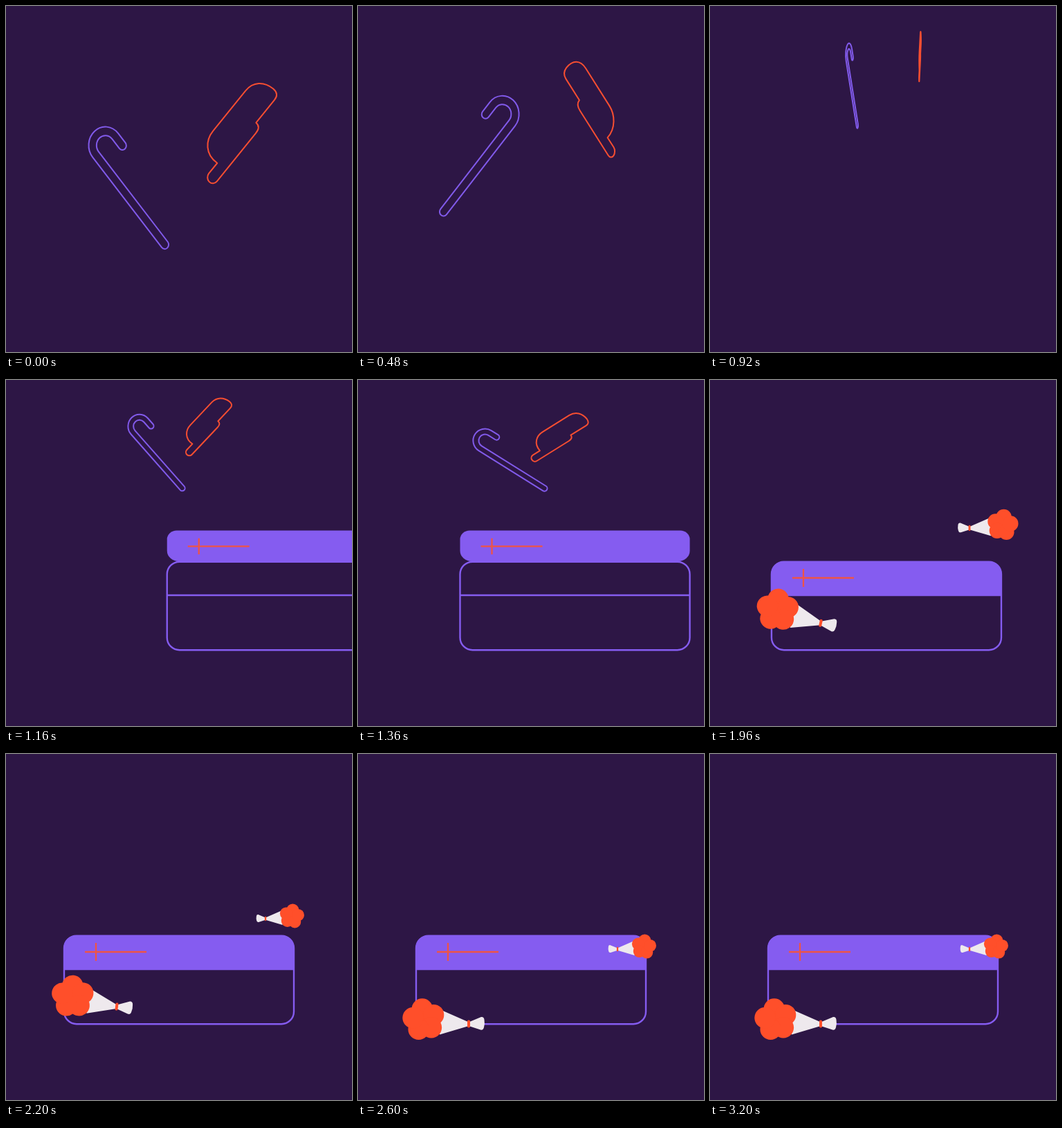
These frames come from a looping animation (500 by 500 pixels, 3.24 s). An HTML page with a canvas:

```html
<!DOCTYPE html>
<html lang="en">
<head>
<meta charset="utf-8">
<title>Gift box</title>
<style>
html, body { margin: 0; width: 100%; height: 100%; overflow: hidden; background: #2d1645; }
canvas { display: block; width: 500px; height: 500px; }
</style>
</head>
<body>
<canvas id="stage" width="500" height="500"></canvas>
<script>
const LOOP = 3240, STEP = 40;
const BG = '#2d1645', PURPLE = '#855cf0', ORANGE = '#ff4f2a', WHITE = '#eee9ed';
const WALL = 311, HINGE = 262, LID = 49.5, APEX = 1065, SLAM = 1880, LAND = 2340;
const ctx = document.getElementById('stage').getContext('2d');

const rad = deg => deg * Math.PI / 180;
const part = (t, from, to) => Math.max(0, Math.min(1, (t - from) / (to - from)));
const ease = (t, from, to) => (1 - Math.cos(Math.PI * part(t, from, to))) / 2;
const bump = (t, from, to) => Math.sin(Math.PI * part(t, from, to));

const CANE = {
  path: canePath, color: '#815aea',
  x: 173, drift: 39.4, lean: 7.2,
  y: 262, rise: 157.5, drop: 222.5, gravity: 3.62,
  size: 0.64, angle: -40.5, tumble: -77.5, spin: 0.0073, drag: 1.5e-6
};
const HAT = {
  path: hatPath, color: '#f64e31',
  x: 342, drift: -49, lean: 0,
  y: 183, rise: 116, drop: 246.5, gravity: 3.34,
  size: 0.585, angle: -48.2, tumble: 72, spin: 0.00565, drag: 0
};

function canePath() {
  const w = 6.3, r = 20.5, x = 9, y = -72, end = y + 171, tail = y + 18;
  ctx.moveTo(x - r - w, y);
  ctx.arc(x, y, r + w, Math.PI, 0);
  ctx.lineTo(x + r + w, tail);
  ctx.arc(x + r, tail, w, 0, Math.PI);
  ctx.lineTo(x + r - w, y);
  ctx.arc(x, y, r - w, 0, Math.PI, true);
  ctx.lineTo(x - r + w, end);
  ctx.arc(x - r, end, w, 0, Math.PI);
  ctx.closePath();
}

function hatPath() {
  ctx.moveTo(-60, -1);
  ctx.bezierCurveTo(-64, -24, -48, -37, -30, -37);
  ctx.lineTo(48, -37);
  ctx.bezierCurveTo(66, -37, 78, -24, 80, -6);
  ctx.quadraticCurveTo(81, 6.5, 69, 6.5);
  ctx.lineTo(25, 6.5);
  ctx.quadraticCurveTo(26, 16.3, 13, 16.3);
  ctx.lineTo(-80, 16.3);
  ctx.arc(-80, 7.6, 8.7, Math.PI / 2, -Math.PI / 2);
  ctx.closePath();
}

// Rises while flipping and shrinking, then tumbles down behind the box wall
function toss(o, t) {
  const fall = Math.max(0, t - APEX) / 655;
  if (fall > 1.15) return;
  const flip = Math.min(2 * Math.PI, -0.45 + o.spin * t - o.drag * t * t);
  const x = o.x + o.drift * ease(t, 200, 1240);
  const y = o.y - o.rise * ease(t, 145, APEX) + o.drop * fall ** o.gravity;
  const size = 1 - (1 - o.size) * ease(t, 410, 930);
  const angle = o.angle + 14 * Math.sin(flip) ** 6 + o.tumble * fall ** 1.86;
  ctx.save();
  ctx.beginPath();
  ctx.rect(0, 0, 500, t > 1360 ? WALL : 500);
  ctx.clip();
  ctx.save();
  ctx.translate(x, y);
  ctx.scale(Math.cos(flip), 1);
  ctx.translate(o.lean, 0);
  ctx.scale(size, size);
  ctx.rotate(rad(angle));
  ctx.beginPath();
  o.path();
  ctx.restore();
  ctx.strokeStyle = o.color;
  ctx.lineWidth = 2;
  ctx.lineJoin = 'round';
  ctx.stroke();
  ctx.restore();
}

const boxLeft = t => 84 + (t > 2160 ? 0 : 63.5 * Math.exp((1360 - t) / 235));

// -1 is fully open, 1 fully closed
const lidFold = t => -Math.cos(rad(26 + 154 * part(t, 1560, SLAM) ** 2.6));

function lid(x, fold) {
  const corner = fold < 0 ? 14 : 14 * (1 - fold);
  ctx.save();
  ctx.translate(x, HINGE);
  ctx.scale(1, fold);
  ctx.beginPath();
  ctx.roundRect(0, 0, 332, LID, [17, 17, corner, corner]);
  ctx.fillStyle = PURPLE;
  ctx.fill();
  ctx.beginPath();
  ctx.moveTo(30, 24);
  ctx.lineTo(119, 24);
  ctx.moveTo(46, 11);
  ctx.lineTo(46, 37);
  ctx.restore();
  ctx.strokeStyle = '#ee5446';
  ctx.lineWidth = 2.3;
  ctx.stroke();
}

function box(x) {
  ctx.strokeStyle = PURPLE;
  ctx.lineWidth = 2.4;
  ctx.beginPath();
  ctx.roundRect(x, HINGE + 0.7, 332, 127.5, 18);
  ctx.moveTo(x, WALL);
  ctx.lineTo(x + 332, WALL);
  ctx.stroke();
}

function disc(x, y, r) {
  ctx.beginPath();
  ctx.arc(x, y, r, 0, 7);
  ctx.fill();
}

// The origin is the knot; the flower points left
function bouquet(x, y, sx, sy, angle) {
  ctx.save();
  ctx.translate(x, y);
  ctx.scale(sx, sy);
  ctx.rotate(rad(angle));
  ctx.fillStyle = WHITE;
  ctx.beginPath();
  ctx.moveTo(-42, -21);
  ctx.lineTo(0, -2.5);
  ctx.lineTo(18, -10);
  ctx.quadraticCurveTo(22, -10.5, 22.5, -6);
  ctx.quadraticCurveTo(23.5, 0, 22, 5);
  ctx.quadraticCurveTo(21, 9.5, 17, 8.5);
  ctx.lineTo(0, 3);
  ctx.lineTo(-42, 15.5);
  ctx.closePath();
  ctx.fill();
  ctx.fillStyle = ORANGE;
  ctx.beginPath();
  ctx.roundRect(-2, -5.5, 4, 11, 1.8);
  ctx.fill();
  disc(-65, -6, 15);
  for (let i = 0; i < 5; i++) {
    const a = rad(-98 + 72 * i);
    disc(-65 + 15.7 * Math.cos(a), -6 + 15.7 * Math.sin(a), 15.2);
  }
  ctx.restore();
}

// Both bouquets hop up when the lid slams
function bouquets(t) {
  const hop = Math.sin(Math.PI * part(t, SLAM, LAND) ** 0.6);
  const grow = part(t, SLAM, SLAM + 80);
  const puff = 1 + 0.3 * bump(t, SLAM, SLAM + 240) + 0.1 * bump(t, LAND, LAND + 220);
  const small = 0.585 * grow * puff;
  bouquet(375, 282 - 76.4 * hop, -small, small, 0);
  bouquet(160, 390 - 43.4 * hop, grow, grow, 13 * hop);
}

function draw(t) {
  ctx.fillStyle = BG;
  ctx.fillRect(0, 0, 500, 500);
  const fold = lidFold(t), x = boxLeft(t), arrived = t > 920;
  if (arrived && fold < 0) lid(x, fold);
  toss(CANE, t);
  toss(HAT, t);
  if (arrived) box(x);
  if (fold >= 0) lid(x, fold);
  if (t > SLAM) bouquets(t);
}

function tick() {
  const t = performance.now() % LOOP;
  draw(Math.floor(t / STEP) * STEP);
  requestAnimationFrame(tick);
}
tick();
</script>
</body>
</html>
```
